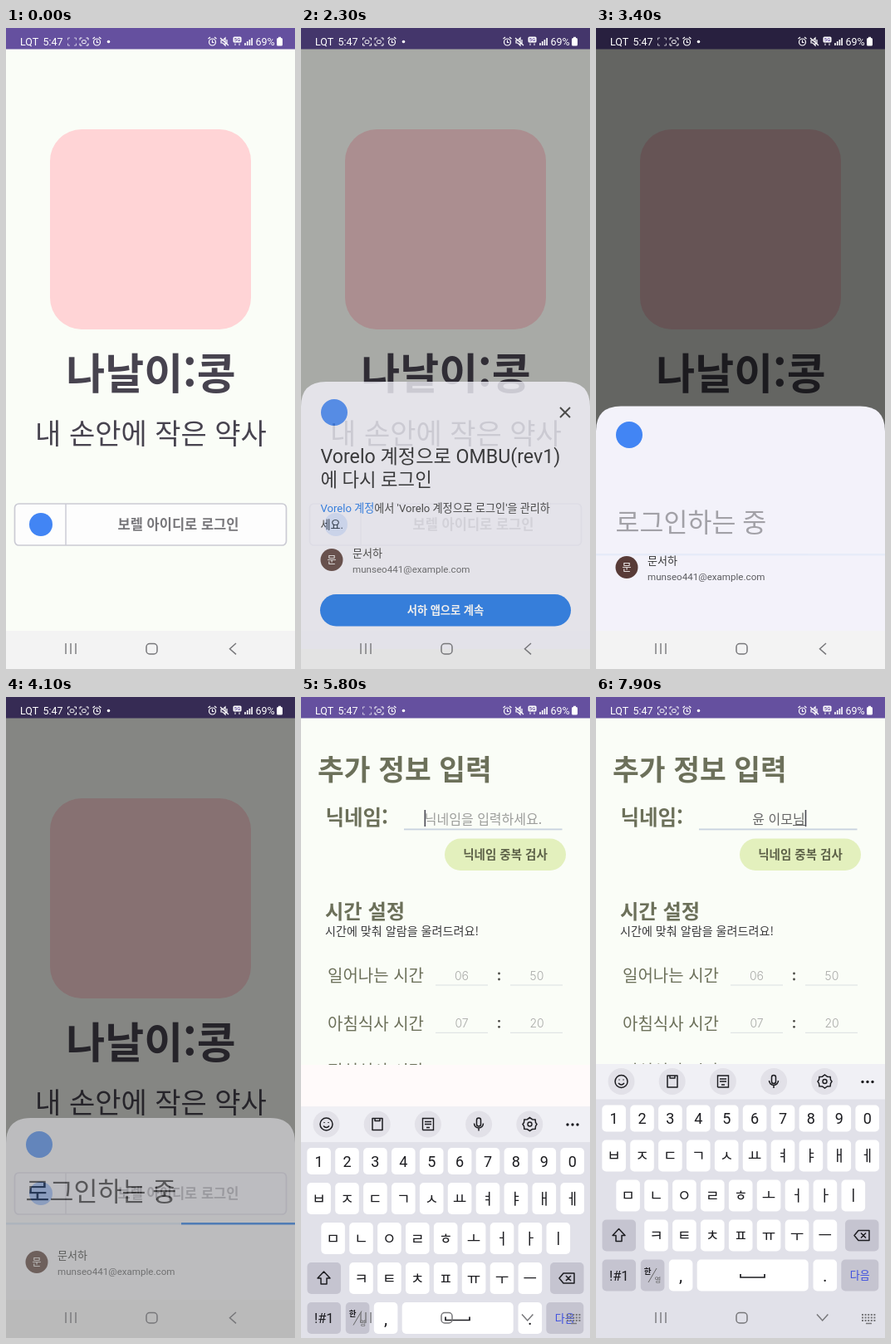
Write an HTML page that moves like this. It is 348 by 772 pixels and loops after 8000 ms.

```html
<!DOCTYPE html>
<html lang="ko">
<head>
<meta charset="utf-8">
<style>
html, body { margin: 0; width: 348px; height: 772px; overflow: hidden; }
svg { display: block; }
text { font-family: "Noto Sans CJK KR", "Noto Sans CJK", sans-serif; white-space: pre; }
.ui text { font-family: Roboto, "Noto Sans CJK KR", "Noto Sans CJK", sans-serif; }
.num { font-family: Inter, sans-serif; }
</style>
</head>
<body>
<svg id="stage" width="348" height="772" viewBox="0 0 348 772"></svg>
<script>
const stage = document.getElementById('stage');
const $ = id => document.getElementById(id);

// ---- drawing helpers (text y is the optical middle of the line) ----
const text = (s, x, y, size, fill, { weight = 400, anchor = 'start', attrs = '' } = {}) =>
  `<text x="${x}" y="${y + size * 0.37}" font-size="${size}" fill="${fill}" font-weight="${weight}" text-anchor="${anchor}" ${attrs}>${s}</text>`;
const mid = (s, x, y, size, fill, weight = 400, attrs = '') => text(s, x, y, size, fill, { weight, anchor: 'middle', attrs });
const rect = (x, y, w, h, fill, r = 0, attrs = '') =>
  `<rect x="${x}" y="${y}" width="${w}" height="${h}" rx="${r}" fill="${fill}" ${attrs}/>`;
const dot = (x, y, r, fill) => `<circle cx="${x}" cy="${y}" r="${r}" fill="${fill}"/>`;
const line = (d, color, width = 1, attrs = '') =>
  `<path d="${d}" fill="none" stroke="${color}" stroke-width="${width}" ${attrs}/>`;

const PAPER = '#fafdf7', PURPLE = '#65509f', NAV = '#f3f3f3', BLUE = '#1a73e8', BRAND = '#4285f4';
const page = rect(0, 0, 348, 726, PAPER) + rect(0, 0, 348, 25.5, PURPLE) + rect(0, 726, 348, 70, NAV);

const login = page
  + rect(53, 122, 242, 241, '#ffd4d6', 38)
  + mid('나날이:콩', 174.5, 416, 51, '#47434f', 900)
  + mid('내 손안에 작은 약사', 174.5, 488, 34, '#47434f')
  + rect(10.5, 573, 327, 50, '#fdfdfd', 5, 'stroke="#cbcbd4" stroke-width="1.7"')
  + line('M72 573V623', '#cbcbd4', 1.5)
  + dot(42, 598, 14, BRAND)
  + mid('보렐 아이디로 로그인', 207.5, 598, 16.5, '#77767a', 700);

const account = dot(37, 618.5, 13.5, '#583b37') + mid('문', 37, 618.5, 12, '#fff')
  + text('문서하', 62, 610, 13, '#333', { weight: 500 })
  + text('munseo441@example.com', 62, 630, 11.6, '#5c5c60');

const sheet = `<path id="sheetBg" fill="#f3f2fa"/>` + rect(0, 726, 348, 46, NAV)
  + `<g id="sheetHead">${dot(40, 441, 16, BRAND)}</g>`
  + `<g id="choose">`
  + line('M312 435l12 12m0-12l-12 12', '#333', 1.9)
  + text('Vorelo 계정으로 OMBU(rev1)', 23.5, 493, 23.2, '#1f1f22')
  + text('에 다시 로그인', 23.5, 522, 22.3, '#1f1f22')
  + text(`<tspan fill="${BLUE}">Vorelo 계정</tspan>에서 'Vorelo 계정으로 로그인'을 관리하`, 23.5, 556, 13.1, '#333')
  + text('세요.', 23.5, 576, 13.1, '#333')
  + rect(23, 660, 302, 38.5, BLUE, 19.25) + rect(23, 660, 302, 38.5, '#fff', 19.25, 'id="press"')
  + mid('서하 앱으로 계속', 174, 679, 13.3, '#fff', 700)
  + `</g><g id="account">${account}</g>`
  + `<g id="signing">${text('로그인하는 중', 23.5, 595, 31.5, '#2a2a2d')}`
  + rect(0, 633, 348, 2.5, '#d5e2f6') + rect(0, 633, 200, 2.5, BLUE, 0, 'id="progress"') + `</g>`;

// ---- profile form ----
const OLIVE = '#6c705a';
const times = [['일어나는 시간', '06', '50'], ['아침식사 시간', '07', '20'], ['점심식사 시간', '11', '10'],
  ['저녁식사 시간', '19', '20'], ['잠자는 시간', '23', '00'], ['식사 시간', '00', '20']];
const form = page
  + text('추가 정보 입력', 20, 87, 34.5, OLIVE, { weight: 900 })
  + text('닉네임:', 29.5, 145, 24.5, OLIVE, { weight: 700 })
  + mid('닉네임을 입력하세요.', 219.5, 147, 16, '#9c9d9b', 400, 'id="hint"')
  + mid('', 220, 147, 16, '#666', 400, 'id="typed"')
  + rect(124, 158.5, 190.5, 1, '#d3d7da', 0, 'id="fieldLine"')
  + rect(0, 154, 14.7, 1, '#666', 0, 'id="composing"')
  + rect(0, 136, 1.6, 20, '#4a4a55', 0, 'id="caret"')
  + rect(173, 170.5, 146, 38.5, '#e3f0bd', 19.25)
  + mid('닉네임 중복 검사', 246, 190, 14.5, '#5d6148', 700)
  + text('시간 설정', 29, 258, 24.3, OLIVE, { weight: 700 })
  + text('시간에 맞춰 알람을 울려드려요!', 29, 282, 14.1, '#3a3a3c')
  + times.map(([label, h, m], i) => {
    const y = 336 + i * 57.3;
    return text(label, 148, y, 20, OLIVE, { anchor: 'end' })
      + mid(h, 193.5, y, 14, '#a9aaa8', 300, 'class="num"') + mid(m, 284, y, 14, '#a9aaa8', 300, 'class="num"')
      + dot(238.5, y - 3, 1.4, '#4a4a45') + dot(238.5, y + 4, 1.4, '#4a4a45')
      + rect(162, y + 10.5, 63, 1, '#dbdfe2') + rect(252, y + 10.5, 63, 1, '#dbdfe2');
  }).join('')
  + text('* 식사 시간은 평균적으로 식사하는 시간을 의미 합니다', 319, 649, 12, '#3a3a3c', { anchor: 'end' })
  + text('개인 정보 수집 동의', 29, 685, 20.5, OLIVE, { weight: 700 })
  + text('개인정보보호법에 따라 나날이:콩에 회원가입 신청하시는', 29, 706, 12, '#4a4a4c')
  + rect(0, 706.5, 348, 19.5, PAPER);

// ---- keyboard ----
const DARK = '#c5c4d0', INK = '#1c1c20';
const key = (x, y, w, h, label = '', fill = '#fff', size = 18, ink = INK) =>
  rect(x, y, w, h, fill, 5, `data-key="${label}"`) + mid(label, x + w / 2, y + h / 2, size, ink);
const keyRow = (chars, x, y, h) => [...chars].map((c, i) => key(x + i * 33.9, y, 28.6, h, c)).join('');
const toolIcons = [
  line('M23 463a7.5 7.5 0 1 1 15 0a7.5 7.5 0 1 1-15 0M27 465q3.5 4 7 0M28 460.5v1M33 460.5v1', INK, 1.5),
  line('M86 456h12v14h-12zM89 456v3h6v-3', INK, 1.5, 'stroke-linejoin="round"'),
  line('M146.5 456h13v14h-13zM149 460h8M149 463h8M151 467h4', INK, 1.4, 'stroke-dasharray="40 0"'),
  line('M211.5 458a2.5 2.5 0 0 1 5 0v5a2.5 2.5 0 0 1-5 0zM208.5 462a5.5 5.5 0 0 0 11 0M214 468v3', INK, 1.5),
  line('M275.5 455l3 2.2 3.6.3 .4 3.5 1.5 2-1.5 2.4-.4 3.4-3.6.2-3 2-3-2-3.6-.2-.4-3.4-1.5-2.4 1.5-2 .4-3.5 3.6-.3z', INK, 1.5)
    + line('M273 463a2.5 2.5 0 1 1 5 0a2.5 2.5 0 1 1-5 0', INK, 1.4),
];
const keyboard = rect(0, 442, 348, 330, '#e1e1e9') + rect(0, 442, 348, 42.5, '#f0f0f5')
  + toolIcons.map((icon, i) => dot(30.5 + i * 61.2, 463, 16, '#e2e1e8') + icon).join('')
  + [321, 327, 333].map(x => dot(x, 463.5, 1.7, INK)).join('')
  + keyRow('1234567890', 7.3, 491.5, 32)
  + keyRow('ㅂㅈㄷㄱㅅㅛㅕㅑㅐㅔ', 7.3, 533.5, 38)
  + keyRow('ㅁㄴㅇㄹㅎㅗㅓㅏㅣ', 24.3, 581.5, 38)
  + keyRow('ㅋㅌㅊㅍㅠㅜㅡ', 58.2, 629.5, 38)
  + key(7.5, 629.5, 40.5, 38, '', DARK) + line('M27.5 640.5l7.5 8h-4v7h-7v-7h-4z', INK, 1.5, 'stroke-linejoin="round"')
  + key(300, 629.5, 40.5, 38, '', DARK) + line('M311 648.5l5-6h13v12h-13zM319 645.5l6 6m0-6l-6 6', INK, 1.5, 'stroke-linejoin="round"')
  + key(7.5, 677.5, 40.5, 38, '!#1', DARK, 16.5)
  + key(53.8, 677.5, 28.6, 38, '', DARK) + mid('한', 62, 691, 9.5, INK, 700) + mid('영', 74.5, 702, 8.5, '#666')
  + line('M63 705l10-17', '#666', 1)
  + key(87.8, 677.5, 28.6, 38, ',', '#fff', 21)
  + key(121.7, 677.5, 134, 38, ' ') + line('M174 695v4h29v-4', INK, 1.7)
  + key(261.5, 677.5, 28.6, 38, '.', '#fff', 21)
  + key(295.3, 677.5, 45, 38, '다음', DARK, 13, '#3b4de0');

// ---- system bars ----
const GREY = '#77777a', W = '#fff';
const navIcons = line('M72 741v13M78 741v13M84 741v13', GREY, 1.4)
  + rect(169, 741.5, 13, 12.5, 'none', 4, `stroke="${GREY}" stroke-width="1.5"`)
  + line('M277 741l-7.5 6.7 7.5 6.7', GREY, 1.5, 'id="back"')
  + `<g id="kbIcon">${line('M320 744h17M320 747.5h17M320 751h17', GREY, 2, 'stroke-dasharray="2 1.6"')}${line('M325 754.5h7', GREY, 1.5)}</g>`;
const bracket = x => line(`M${x + 2.5} 12h-2.5v2.5m0 4v2.5h2.5m5 0h2.5v-2.5m0-4v-2.5h-2.5`, W, 1);
const alarm = x => line(`M${x - 4} 17a4 4 0 1 1 8 0a4 4 0 1 1-8 0M${x} 14.5v3h2M${x - 5} 13l2.5-2M${x + 5} 13l-2.5-2`, W, 1.2);
const status = text('LQT', 17, 16.5, 12.5, W) + text('5:47', 44.5, 16.5, 12.5, W)
  + `<g id="rec">${bracket(74.5)}<g id="recDot">${rect(77.2, 14.8, 4.6, 3.8, 'none', 1, 'stroke="#fff"')}</g></g>`
  + bracket(89) + rect(91.6, 14.8, 4.6, 3.8, 'none', 1, 'stroke="#fff"')
  + alarm(109.5) + dot(123.5, 16.5, 1.8, W)
  + alarm(248.5) + line('M259 15h2l3-3v9l-3-3h-2zM258 12l10 9M266 14v5', W, 1.2)
  + rect(273.5, 10.5, 10, 7, W, 1.5) + mid('5G', 278.5, 14, 6, PURPLE, 700) + line('M276 21v-2.5M281 21v-2.5', W, 1)
  + line('M288 21v-3M290.7 21v-5M293.4 21v-7M296.1 21v-9', W, 1.6)
  + text('69%', 300.5, 16.5, 12.5, W)
  + rect(326, 12, 7, 9.5, W, 1.5) + rect(328, 10.8, 3, 2, W);

stage.innerHTML = login
  + rect(0, 0, 348, 772, '#000', 0, 'id="dim"')
  + `<g id="sheetFade" class="ui"><g id="sheet">${sheet}</g></g>`
  + rect(0, 0, 348, 772, '#000', 0, 'id="black"')
  + `<g id="form">${form}</g>`
  + rect(0, 443, 348, 329, '#fffafa', 0, 'id="gap"')
  + `<g id="keyboard" class="ui">${keyboard}</g>`
  + navIcons + `<g class="ui">${status}</g>`;

// ---- motion ----
const clamp = v => Math.min(1, Math.max(0, v));
// Piecewise linear value through [time, value] pairs.
const track = (t, pts) => {
  if (t <= pts[0][0]) return pts[0][1];
  for (let i = 1; i < pts.length; i++) {
    const [t0, a] = pts[i - 1], [t1, b] = pts[i];
    if (t <= t1) return a + (b - a) * (t - t0) / (t1 - t0);
  }
  return pts[pts.length - 1][1];
};
const set = (id, attrs) => { for (const k in attrs) $(id).setAttribute(k, attrs[k]); };
const show = (id, on) => set(id, { display: on ? 'inline' : 'none' });
const shift = (id, y) => set(id, { transform: `translate(0 ${y})` });
const slide = (t, start, span, dist) => dist * (1 - clamp((t - start) / span)) ** 3;

const strokes = [...'ㅇㅠㄴ ㅇㅣㅁㅗㄴㅣㅁ'];
const words = ['', 'ㅇ', '유', '윤', '윤 ', '윤 ㅇ', '윤 이', '윤 임', '윤 이모', '윤 이몬', '윤 이모니', '윤 이모님'];
const keyRects = [...stage.querySelectorAll('[data-key]')].filter(k => strokes.includes(k.dataset.key));
const strokeCount = t => t < 7100 ? Math.max(0, (t - 6400) / 100) : Math.min(11, 6 + (t - 7100) / 100);

function drawSheet(t) {
  set('dim', { opacity: track(t, [[2000, 0], [2100, .06], [2500, .6], [4000, .6], [4100, .47], [4300, 0]]) });
  set('sheetFade', { opacity: track(t, [[2000, 0], [2100, .06], [2300, .8], [2400, 1], [4000, 1], [4100, .5], [4300, 0]]) });
  shift('sheet', track(t, [[2100, 131], [2200, 62], [2300, 22], [2400, 6], [2500, 0]]));
  const k = clamp((t - 3200) / 400), ease = k * k * (3 - 2 * k), top = 404 + 103 * ease;
  set('sheetBg', { d: `M0 920V${top + 30}Q0 ${top} 30 ${top}H318Q348 ${top} 348 ${top + 30}V920z` });
  shift('sheetHead', 98 * ease);
  shift('account', 62 * ease);
  set('choose', { opacity: clamp(1 - k * 2.5) });
  set('signing', { opacity: clamp(k * 2 - .6) });
  set('press', { opacity: t >= 3100 && t < 3400 ? .18 : 0 });
  set('progress', { x: -200 + 685 * ((t + 500) % 1000) / 1000 });
}

function drawForm(t) {
  const fade = clamp((t - 4200) / 250);
  set('black', { opacity: fade });
  set('form', { opacity: fade });
  shift('form', slide(t, 4200, 530, 150));

  const n = strokeCount(t), word = words[n], focused = t >= 5200;
  show('hint', !n);
  $('typed').textContent = word;
  set('fieldLine', { height: focused ? 1.8 : 1, fill: focused ? '#c8d2df' : '#d3d7da' });
  const end = n ? 220 + $('typed').getComputedTextLength() / 2 : 148.5;
  set('caret', { x: end });
  show('caret', focused && (n || t < 6100));
  set('composing', { x: end - 14.7 });
  show('composing', n && !word.endsWith(' '));

  const typing = t >= 5600;
  show('gap', typing);
  show('keyboard', typing);
  shift('keyboard', slide(t, 5500, 650, 330));
  show('kbIcon', typing);
  set('back', { transform: typing ? 'rotate(-90 272.7 747.7)' : '' });
  const pressed = n && strokeCount(t - 100) !== n ? strokes[n - 1] : null;
  keyRects.forEach(k => k.setAttribute('fill', k.dataset.key === pressed ? '#d3d3dc' : '#fff'));
}

function draw(now) {
  const t = Math.floor(now % 8000 / 100) * 100;
  const lit = t >= 100 && Math.floor((t + 100) / 500) % 2 === 0;
  show('recDot', lit);
  set('rec', { opacity: lit ? 1 : .65 });
  drawSheet(t);
  drawForm(t);
}

const start = performance.now();
const loop = () => { draw(performance.now() - start); requestAnimationFrame(loop); };
loop();
</script>
</body>
</html>
```
